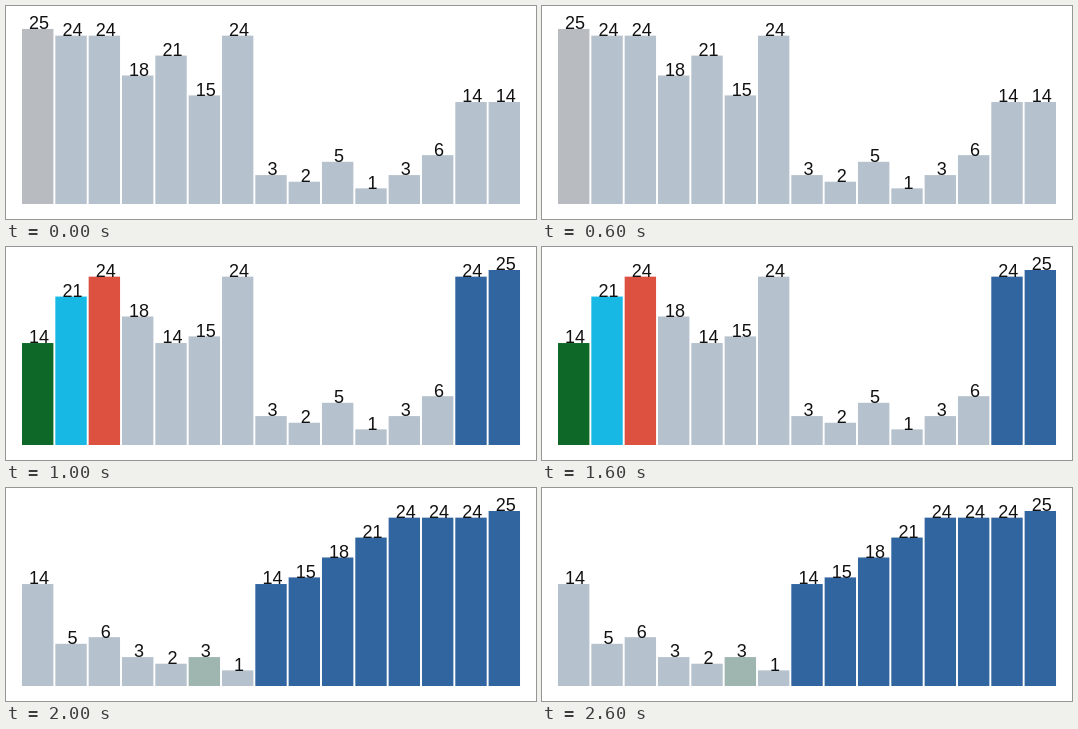
Recreate the animation shown at these times as an HTML page. Size 530 by 213 pixels, loop 3 s.

```html
<!DOCTYPE html>
<html lang="en">
<head>
<meta charset="utf-8">
<title>Heap sort</title>
<style>
  html, body { margin: 0; width: 100%; height: 100%; overflow: hidden; background: #fff; }
  svg { display: block; }
  text { font: 18px "Liberation Sans", Arial, sans-serif; text-anchor: middle; fill: #111; }
</style>
</head>
<body>
<svg id="stage" width="530" height="213" viewBox="0 0 530 213"></svg>
<script>
const STEP = 1000;
const BASE = 198, LEFT = 16, PITCH = 33.33, WIDTH = 31.4;
const GREY = '#b5c2cd', SORTED = '#3165a0';
const PARENT = '#0e6827', LEFT_CHILD = '#17b8e4', RIGHT_CHILD = '#dc5140';

const stage = document.getElementById('stage');
const heap = [25, 24, 24, 18, 21, 15, 24, 3, 2, 5, 1, 3, 6, 14, 14];
let size = heap.length;

function swap(a, b) {
  [heap[a], heap[b]] = [heap[b], heap[a]];
}

// Move the largest value to the front of the sorted tail.
function extractMax() {
  swap(0, --size);
}

// Restore the heap and return where the root value came to rest.
function siftDown(parent = 0) {
  let largest = parent;
  for (const child of [2 * parent + 1, 2 * parent + 2])
    if (child < size && heap[child] > heap[largest]) largest = child;
  if (largest === parent) return parent;
  swap(parent, largest);
  return siftDown(largest);
}

function bar(value, i, fill) {
  const height = 9 + 6.64 * value;
  const x = LEFT + i * PITCH, y = BASE - height;
  return `<rect x="${x}" y="${y}" width="${WIDTH}" height="${height}" fill="${fill}"/>` +
    `<text x="${x + WIDTH / 2 + 1.4}" y="${y + 0.4}">${value}</text>`;
}

function snapshot(marks) {
  return heap.map((value, i) =>
    bar(value, i, marks[i] || (i < size ? GREY : SORTED))).join('');
}

const scenes = [snapshot({ 0: '#b8bbc0' })];

extractMax();
siftDown();
extractMax();
scenes.push(snapshot({ 0: PARENT, 1: LEFT_CHILD, 2: RIGHT_CHILD }));

let settled = siftDown();
while (size > 7) {
  extractMax();
  settled = siftDown();
}
scenes.push(snapshot({ [settled]: '#9fb5b0' }));

let shown = -1;
function tick() {
  const index = Math.floor(performance.now() / STEP) % scenes.length;
  if (index !== shown) stage.innerHTML = scenes[shown = index];
  requestAnimationFrame(tick);
}
tick();
</script>
</body>
</html>
```
